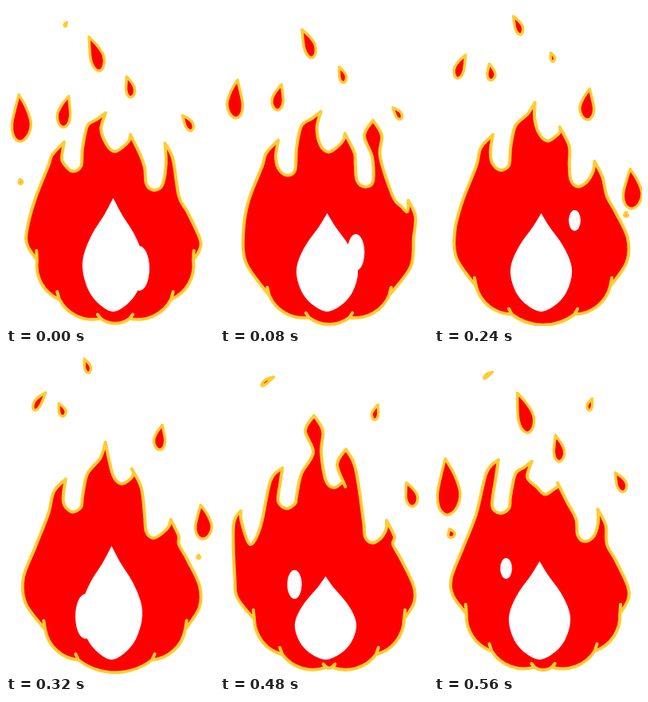
These frames come from a looping animation (261x400 px, 640 ms). An HTML page:

```html
<!DOCTYPE html>
<html lang="en">
<head>
<meta charset="utf-8">
<title>Flame</title>
<style>
  html, body { margin: 0; width: 100%; height: 100%; overflow: hidden; background: #fff; }
  svg { display: block; width: 261px; height: 400px; }
  #body, #drops { fill: #f00; stroke: #fc3; stroke-width: 4; stroke-linejoin: round; stroke-linecap: round; }
  #drops { stroke-width: 3.5; }
  #core { fill: #fff; }
</style>
</head>
<body>
<svg viewBox="0 0 261 400">
  <path id="body"/>
  <path id="core"/>
  <path id="drops"/>
</svg>
<script>
const STEP = 80, POSES = 8;

// A tongue swings out and back by "sway", is stretched by "lift", then tears off and starts again.
const tongues = {
  farLeft: { birth: 7, base: [32, 245], sway: [0, 0], lift: [-6, -49], power: 5 },
  left: { birth: 0, base: [73, 170], sway: [0, -5], lift: [8, -38] },
  middle: { birth: 7, base: [123, 134], sway: [5, 0], lift: [-5, -57] },
  second: { birth: 7, base: [155, 161], sway: [2, 0], lift: [3, -42] },
  right: { birth: 2, base: [195, 177], sway: [15, 40], lift: [-3, -34] },
  farRight: { birth: 3, base: [233, 255], sway: [0, 0], lift: [7, -26], power: 5 }
};

// Drops fly between two states: tip x, tip y, base x, base y, width.
const drops = [
  { birth: 7, life: 9, from: [14, 129, 17, 203, 32], to: [77, 19, 73, 27, 6], drag: 1.7 },
  { birth: 0, life: 5, from: [79, 111, 71, 153, 20], to: [64, 53, 74, 69, 11] },
  { birth: 7, life: 6, from: [104, 47, 119, 100, 23], to: [97, 0, 98, 17, 10] },
  { birth: 7, life: 4, from: [152, 100, 158, 136, 17], to: [146, 57, 150, 71, 9] },
  { birth: 2, life: 5, from: [195, 118, 192, 168, 25], to: [199, 54, 194, 72, 10] },
  { birth: 3, life: 7, from: [246, 202, 248, 255, 27], to: [214, 119, 221, 133, 10] },
  { birth: 7, life: 1, from: [19, 217, 23, 231, 12], to: [17, 215, 19, 224, 8] },
  { birth: 3, life: 2, from: [241, 256, 241, 265, 8], to: [243, 245, 244, 252, 6] }
];

const ageAt = (pose, birth) => (pose - birth + POSES) % POSES;
const wave = (pose, peak, period = POSES) => Math.cos(2 * Math.PI * (pose - peak) / period);
const mix = (a, b, t) => a + (b - a) * t;
const add = ([x, y], dx, dy) => [x + dx, y + dy];
const middle = (a, b) => [mix(a[0], b[0], .5), mix(a[1], b[1], .5)];
const text = point => point.map(v => v.toFixed(1)).join(" ");

// Catmull-Rom curve through the points, as cubic segments.
function curve(points) {
  const at = i => points[Math.max(0, Math.min(points.length - 1, i))];
  const handle = (i, sign) => text(at(i).map((v, k) => v + sign * (at(i + 1)[k] - at(i - 1)[k]) / 6));
  return points.slice(1).map((p, i) => `C${handle(i, 1)} ${handle(i + 1, -1)} ${text(p)}`).join("");
}

function tongueAt(pose, { birth, base, sway, lift, power = 2.6 }) {
  const age = ageAt(pose, birth), t = age / (POSES - 1);
  const stretch = t ** power;
  const tip = base.map((v, k) => v + sway[k] * Math.sin(Math.PI * t) + lift[k] * stretch);
  return { tip, stretch, tearing: age === POSES - 1, raised: age >= POSES - 2 };
}

// Bulge and thin neck of a tongue about to tear off, from the top down.
const neck = (tip, side) => [add(tip, side * 11, 19), add(tip, 4 + side * 5, 46)];

// Notches start at the bottom and wander outwards along the belly.
function notchAt(age, side) {
  const angle = age * 4.25 * Math.PI / 180, s = Math.sin(angle), c = Math.cos(angle);
  const inner = [137 + side * 100 * s, 290 + 98 * c];
  return { inner, outer: add(inner, -side * 4 * c * Math.min(1, age), 3 + 9 * s) };
}

function notchesAt(pose, side) {
  const ages = [];
  for (let age = ageAt(pose, 5); age < 20; age += POSES) ages.push(age);
  return ages.map(age => notchAt(age, side));
}

// Side of the belly between the highest notch and the widest point.
function flank(start, widest, side) {
  const bulge = .15 * Math.hypot(widest[0] - start[0], widest[1] - start[1]);
  return [start, add(middle(start, widest), side * bulge, 0), widest];
}

function bodyAt(pose) {
  const t = {};
  for (const name in tongues) t[name] = tongueAt(pose, tongues[name]);

  const dip1 = [83, 202 + 10 * wave(pose, 1.4)];
  const dip2 = [140.5 - 5 * wave(pose, .6), 172 + 11 * wave(pose, .6)];
  const dip3 = [185 + 6 * wave(pose, 6), 230 + 6 * wave(pose, 6)];
  const leftNotches = notchesAt(pose, -1), rightNotches = notchesAt(pose, 1);
  const leftEnd = leftNotches[leftNotches.length - 1].outer;
  const rightEnd = rightNotches[rightNotches.length - 1].outer;
  const leftBelly = flank(leftEnd, [24 + 6 * wave(pose, 1.5), 280], -1);
  const rightBelly = flank(rightEnd, [243, 290], 1).reverse();

  const fall = ({ tip, stretch }, dip, lean, pull = 0) =>
    [add(tip, lean + pull * stretch, 20), add(dip, -10, -9), dip];
  const climb = (dip, { tip, tearing }) => {
    const foot = add(dip, 11, -6);
    return [foot, ...(tearing ? neck(tip, -1).reverse() : [add(middle(foot, tip), 3, 0)]), tip];
  };

  const { farLeft, left, middle: mid, second, right, farRight } = t;
  const shoulder = [102, 150];
  const runs = [];

  if (farLeft.raised) {
    runs.push([...leftBelly, add(farLeft.tip, -9, 18), farLeft.tip]);
    runs.push([farLeft.tip, add(farLeft.tip, 1, 14), [38, 238], [51, 215], add(left.tip, -15, 16), left.tip]);
  } else {
    runs.push([...leftBelly, [36, 243], [53, 200], add(left.tip, -15, 16), left.tip]);
  }
  runs.push([left.tip, ...fall(left, dip1, -3), add(dip1, 11, -6), [96, 178], shoulder,
    ...(mid.tearing ? neck(mid.tip, -1).reverse() : [add(middle(shoulder, mid.tip), 12 * mid.stretch, 0)]), mid.tip]);
  runs.push([mid.tip, ...(mid.tearing ? [...neck(mid.tip, 1), add(dip2, -10, -9), dip2] : fall(mid, dip2, -6, 24)),
    ...climb(dip2, second)]);
  runs.push([second.tip, add(second.tip, 12, 24), add(dip3, -11, -28), add(dip3, -9, -8), dip3, ...climb(dip3, right)]);

  const rightSide = [right.tip, ...(right.tearing ? neck(right.tip, 1) : [add(right.tip, 10, 20)]), [217, 238]];
  if (farRight.raised) {
    runs.push([...rightSide, [228, 251], add(farRight.tip, -1, 14), farRight.tip]);
    runs.push([farRight.tip, add(farRight.tip, 9, 20), ...rightBelly]);
  } else {
    runs.push([...rightSide, [228, 258], ...rightBelly]);
  }

  const chain = [...rightNotches.reverse(), ...leftNotches.slice(ageAt(pose, 5) === 0 ? 1 : 0)];
  const lobes = chain.map(({ inner, outer }, i) => {
    const before = i ? chain[i - 1].outer : outer;
    const radius = .82 * Math.hypot(outer[0] - before[0], outer[1] - before[1]);
    const arc = i ? `A${radius} ${radius} 0 0 1 ${text(outer)}` : "";
    return `${arc}L${text(inner)}L${text(outer)}`;
  });
  return "M" + text(leftEnd) + runs.map(curve).join("") + lobes.join("") + "Z";
}

// Closed shape with a pointed tip, built from [along, side] pairs of one half.
function teardrop(half, place) {
  const other = half.slice(0, -1).reverse().map(([along, side]) => [along, -side]);
  const points = [[0, 0], ...half, ...other, [0, 0]].map(place);
  return "M" + text(points[0]) + curve(points) + "Z";
}

function dropShape([tipX, tipY, baseX, baseY, width]) {
  const length = Math.hypot(baseX - tipX, baseY - tipY);
  const ux = (baseX - tipX) / length, uy = (baseY - tipY) / length;
  const inset = 1.75, half = width / 2 - inset;
  const bend = Math.sign(tipX - baseX) * .04 * length;
  return teardrop([[.3, .6], [.62, 1], [.88, .75], [1, 0]], ([along, side]) => {
    const a = inset + along * (length - 2 * inset);
    const s = side * half + bend * Math.sin(Math.PI * along);
    return [tipX + ux * a - uy * s, tipY + uy * a + ux * s];
  });
}

function dropsAt(pose) {
  let d = "";
  for (const { birth, life, from, to, drag = 1.3 } of drops) {
    for (let age = ageAt(pose, birth); age <= life; age += POSES) {
      const t = age / life, up = 1 - (1 - t) ** drag;
      const progress = [t * t * (3 - 2 * t), up, t * t, up, up];
      d += dropShape(from.map((v, i) => mix(v, to[i], progress[i])));
    }
  }
  return d;
}

// The white centre bobs while a bubble leaves it, on alternate sides.
function coreAt(pose) {
  const beat = pose % 4;
  const top = 259 - 19 * wave(beat, 0, 4), height = 382 - top;
  const half = [[.14, .28], [.32, .7], [.5, .97], [.65, 1], [.82, .8], [.94, .44], [1, 0]];
  const x = 167.5 + 3 * beat, y = 328 - 20 * beat, rx = 12.5 - 1.7 * beat, ry = 28 - 5 * beat;
  const bubble = `M${x} ${y - ry}a${rx} ${ry} 0 0 0 0 ${2 * ry}a${rx} ${ry} 0 0 0 0 ${-2 * ry}Z`;
  return teardrop(half, ([along, side]) => [134.5 - side * 38, top + along * height]) + bubble;
}

const [body, core, dropPath] = ["body", "core", "drops"].map(id => document.getElementById(id));
let shown = -1;

function show(pose) {
  if (pose === shown) return;
  shown = pose;
  body.setAttribute("d", bodyAt(pose));
  core.setAttribute("d", coreAt(pose));
  core.setAttribute("transform", pose < 4 ? "" : "translate(267) scale(-1 1)");
  dropPath.setAttribute("d", dropsAt(pose));
}

const start = performance.now();
function tick() {
  show(Math.floor((performance.now() - start) / STEP) % POSES);
  requestAnimationFrame(tick);
}
tick();
</script>
</body>
</html>
```
